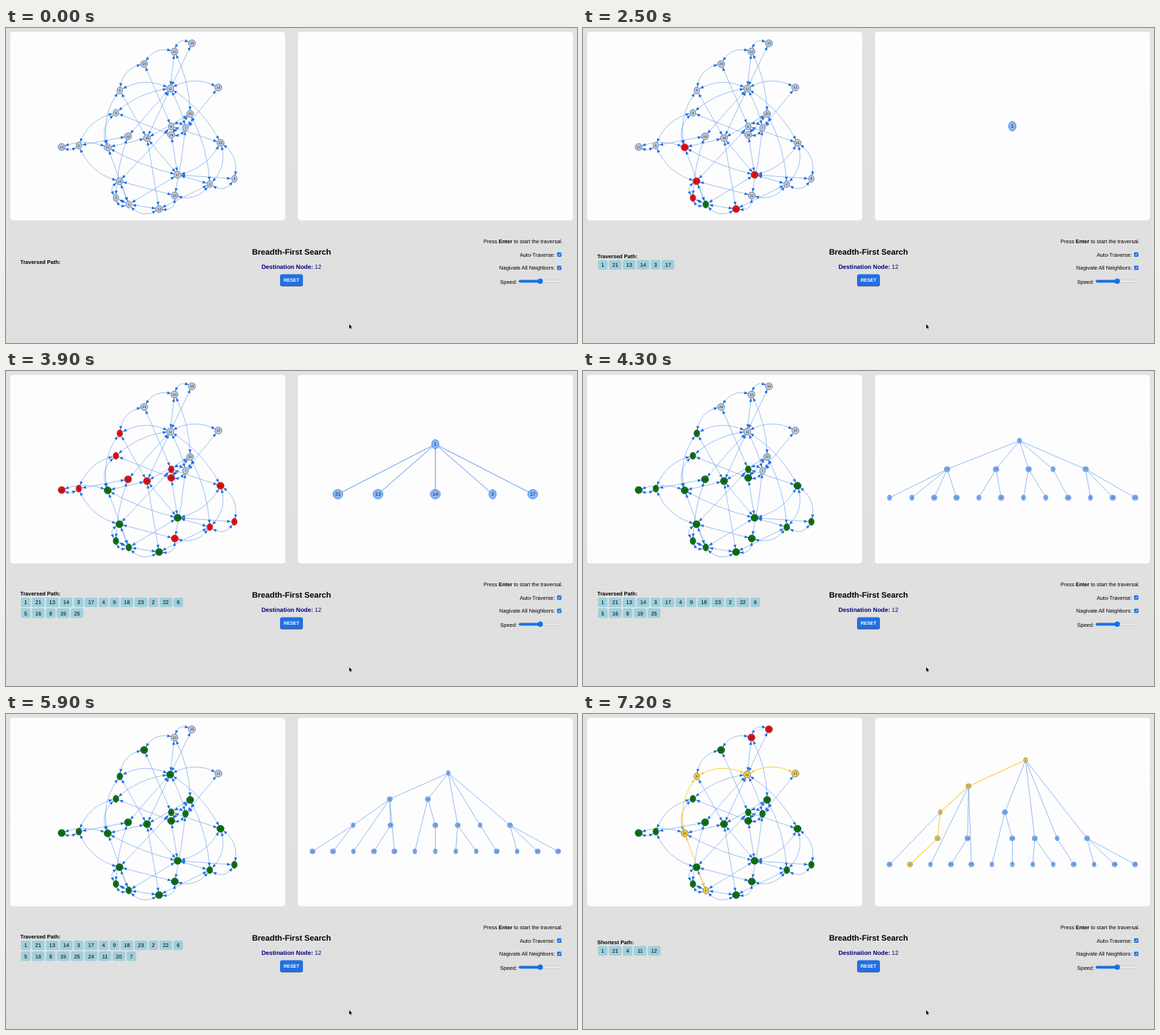
An HTML page with a canvas that plays this animation: 800 by 442 pixels, repeating every 7.3 s.

```html
<!DOCTYPE html>
<html lang="en">
<head>
<meta charset="utf-8">
<title>Breadth-First Search</title>
<style>
html, body { margin: 0; width: 100%; height: 100%; overflow: hidden; background: #e0e0e0; }
canvas { display: block; width: 800px; height: 442px; }
</style>
</head>
<body>
<canvas id="stage"></canvas>
<script>
const LOOP = 7300, START = 600, STEP = 720, LAST = 8;
const ROOT = 1, GOAL = 12;
const FONT = '"Liberation Sans", Arial, sans-serif';
const BLUE = '#1f6fe0', GOLD = '#f9d03f';
const RED_LOOK = ['#ec1014', '#a81a2c'], GREEN_LOOK = ['#077a10', '#0c4218'];
const GREY_LOOK = ['#cccccc', '#3d78cc'], GOLD_LOOK = ['#f8d03c', '#6c7788'];

const canvas = document.getElementById('stage');
const ctx = canvas.getContext('2d');
const dpr = window.devicePixelRatio || 1;
canvas.width = 800 * dpr;
canvas.height = 442 * dpr;

const clamp = (v, lo, hi) => Math.max(lo, Math.min(hi, v));
const mean = list => list.reduce((sum, v) => sum + v, 0) / list.length;

// Positions of nodes 1 to 25
const nodes = [
  [172, 247.5], [285.5, 219], [154, 238.5], [159.5, 87.5], [102, 165],
  [231.5, 138], [251.5, 140], [320, 211.5], [154, 119], [236, 33],
  [230, 85], [297.5, 83.5], [214.5, 254], [159, 215], [260.5, 21.5],
  [171, 152], [240.5, 206], [197.5, 154.5], [231.5, 150], [258, 120.5],
  [142.5, 167.5], [236.5, 235], [78, 167], [193.5, 50.5], [300.5, 161]
];
const at = id => nodes[id - 1];

// Neighbours of each node; "~" marks a straight edge, "^" one arching upwards
const links = `1:21~ 13 14~ 3 17~ 13~ 3~|21:4 9 18 23^ 17|13:2~ 22 18|14:6 5 22~ 3|3:16
|17:8~ 19 25 2~ 18|4:24 11 18|9:5 11 19|18:20 11|2:20 25 8 22|22:7|6:24 25 7 19
|5:16 23|16:11|8:25|19:7 20|25:11|24:10|11:10 15 12 7|20:10 7|7:12|10:15`;

// Outer and short edges bow away from the middle of the graph
function makeEdge(a, b, mark) {
  const [x0, y0] = at(a), [x1, y1] = at(b);
  const mx = (x0 + x1) / 2, my = (y0 + y1) / 2;
  const len = Math.hypot(x1 - x0, y1 - y0);
  const nx = (y1 - y0) / len, ny = (x0 - x1) / len;
  const out = (mx - 215) * nx + (my - 150) * ny;
  const size = Math.max(0, Math.abs(out) - 30) * 0.3 + Math.max(0, 40 - len) * 0.3;
  let bow = Math.sign(out) * Math.min(size, 10, len * 0.35);
  if (mark === '~') bow = 0;
  if (mark === '^') bow = -7 * Math.sign(ny);
  return { a, b, p: [x0, y0, mx + nx * bow * 2, my + ny * bow * 2, x1, y1] };
}
const edges = links.split('|').flatMap(part => {
  const [a, rest] = part.trim().split(':');
  return rest.split(' ').map(s => makeEdge(+a, parseInt(s), s.replace(/\d/g, '')));
});

// Breadth-first search
const parent = { [ROOT]: 0 };
const levels = [[ROOT]];
while (!(GOAL in parent)) {
  const next = [];
  for (const id of levels.at(-1))
    for (const { a, b } of edges) {
      const other = a === id ? b : b === id ? a : 0;
      if (!other || other in parent) continue;
      parent[other] = id;
      next.push(other);
    }
  levels.push(next);
}
const shortest = [];
for (let id = GOAL; id; id = parent[id]) shortest.unshift(id);
const onPath = id => shortest.includes(id);
const onRoute = (a, b) => onPath(a) && onPath(b) && (parent[a] === b || parent[b] === a);

// Leaves share the bottom row, every other node sits above its children
function layoutTree(ids) {
  const info = new Map(), leaves = [];
  const visit = id => {
    const kids = ids.filter(k => parent[k] === id);
    kids.forEach(visit);
    if (!kids.length) leaves.push(id);
    info.set(id, { kids, height: kids.length ? 1 + Math.max(...kids.map(k => info.get(k).height)) : 0 });
  };
  visit(ROOT);

  const n = leaves.length, cx = 601.5, cy = 137.8;
  const size = n > 1 ? Math.min(6.5, 344 / (n - 1) / 8.45) : 6.7;
  const half = Math.min(172, (n - 1) * 5.25 * size);
  const bulge = half < 172 ? 0.235 : 0;
  const gap = size * 10.8, depth = info.get(ROOT).height;
  for (const [id, item] of info) {
    if (item.kids.length) {
      item.x = cx + 0.73 * (mean(item.kids.map(k => info.get(k).x)) - cx);
    } else {
      const u = n > 1 ? leaves.indexOf(id) / (n - 1) * 2 - 1 : 0;
      item.x = cx + half * u * (1 + bulge * (1 - u * u));
    }
    item.y = cy + gap * (depth / 2 - item.height);
  }
  return { size, info };
}
const trees = levels.map((_, k) =>
  layoutTree(k < 4 ? levels.slice(0, k + 1).flat() : [...levels.slice(0, k).flat(), GOAL]));

function text(str, x, y, size, { bold, color = '#000', align = 'left' } = {}) {
  ctx.font = `${bold ? 'bold ' : ''}${size}px ${FONT}`;
  ctx.fillStyle = color;
  ctx.textAlign = align;
  ctx.fillText(str, x, y + size * 0.36);
  return ctx.measureText(str).width;
}

function box(x, y, w, h, r, fill, stroke) {
  ctx.beginPath();
  ctx.roundRect(x, y, w, h, r);
  ctx.fillStyle = fill;
  ctx.fill();
  if (!stroke) return;
  ctx.strokeStyle = stroke;
  ctx.lineWidth = 0.6;
  ctx.stroke();
}

function drawNode(id, x, y, rx, ry, font, [fill, border], width) {
  ctx.beginPath();
  ctx.ellipse(x, y, rx, ry, 0, 0, Math.PI * 2);
  ctx.fillStyle = fill;
  ctx.fill();
  ctx.strokeStyle = border;
  ctx.lineWidth = width;
  ctx.stroke();
  text(String(id), x, y, font, { color: '#222', align: 'center' });
}

function pointOn([x0, y0, cx, cy, x1, y1], t) {
  const u = 1 - t;
  return [u * u * x0 + 2 * u * t * cx + t * t * x1, u * u * y0 + 2 * u * t * cy + t * t * y1];
}

// Point of the curve at a given distance from its first end
function leave(p, dist) {
  let lo = 0, hi = 0.6;
  for (let i = 0; i < 14; i++) {
    const t = (lo + hi) / 2, [x, y] = pointOn(p, t);
    if (Math.hypot(x - p[0], y - p[1]) < dist) lo = t; else hi = t;
  }
  return pointOn(p, lo);
}

function arrow(p) {
  const [tx, ty] = leave(p, 5), [bx, by] = leave(p, 10.3);
  const len = Math.hypot(tx - bx, ty - by) || 1;
  const nx = (ty - by) / len * 2.1, ny = (bx - tx) / len * 2.1;
  ctx.beginPath();
  ctx.moveTo(tx, ty);
  ctx.lineTo(bx + nx, by + ny);
  ctx.lineTo(bx - nx, by - ny);
  ctx.fill();
}

function drawEdge({ p }, gold) {
  ctx.strokeStyle = gold ? GOLD : '#4d8eea';
  ctx.fillStyle = gold ? GOLD : BLUE;
  ctx.lineWidth = gold ? 1 : 0.55;
  ctx.beginPath();
  ctx.moveTo(p[0], p[1]);
  ctx.quadraticCurveTo(...p.slice(2));
  ctx.stroke();
  arrow(p);
  arrow([p[4], p[5], p[2], p[3], p[0], p[1]]);
}

function drawGraph(step) {
  const done = step >= LAST;
  const isGold = e => done && onRoute(e.a, e.b);
  edges.filter(e => !isGold(e)).forEach(e => drawEdge(e, false));
  edges.filter(isGold).forEach(e => drawEdge(e, true));
  nodes.forEach(([x, y], i) => {
    const id = i + 1;
    const age = step - 2 * levels.findIndex(l => l.includes(id));
    const look = done && onPath(id) ? GOLD_LOOK : age > 0 ? GREEN_LOOK : age === 0 ? RED_LOOK : GREY_LOOK;
    drawNode(id, x, y, id > 9 ? 4.9 : 3.8, 4.8, 5, look, 0.9);
  });
}

function drawTree(step) {
  if (step < 1) return;
  const done = step >= LAST;
  const { size, info } = trees[done ? 4 : Math.floor((step - 1) / 2)];
  const big = size > 5;
  for (const [id, { x, y }] of info) {
    const from = info.get(parent[id]);
    if (!from) continue;
    const gold = done && onRoute(id, parent[id]);
    ctx.strokeStyle = gold ? GOLD : '#4d8de9';
    ctx.lineWidth = gold ? 1.1 : big ? 0.9 : 0.6;
    ctx.beginPath();
    ctx.moveTo(from.x, from.y);
    ctx.lineTo(x, y);
    ctx.stroke();
  }
  for (const [id, { x, y }] of info) {
    const look = done && onPath(id) ? GOLD_LOOK : ['#8ab6fa', '#3b80e6'];
    drawNode(id, x, y, size * (id > 9 ? 1.06 : 0.77), size, size * 1.07, look, big ? 0.9 : 0.7);
  }
}

function drawPath(step) {
  const done = step >= LAST;
  const ids = done ? shortest : levels.slice(0, Math.floor(step / 2) + 1).flat();
  const y = 327.8 - 7.6 * Math.ceil(ids.length / 13);
  text(done ? 'Shortest Path:' : 'Traversed Path:', 20, y, 7.5, { bold: true });
  let x = 21;
  ids.forEach((id, i) => {
    if (i === 13) x = 21;
    const w = id > 9 ? 17.6 : 13.4, cy = y + 12 + 15.2 * Math.floor(i / 13);
    box(x, cy - 6.7, w, 13.4, 2, '#9fcfdc');
    text(String(id), x + w / 2, cy, 7.5, { align: 'center' });
    x += w + 1.95;
  });
}

function checkbox(label, y) {
  text(label, 769, y, 7.5, { align: 'right' });
  box(772.1, y - 3, 6.1, 6.1, 1.2, '#1470e8');
  ctx.strokeStyle = '#fff';
  ctx.lineWidth = 0.9;
  ctx.beginPath();
  ctx.moveTo(773.5, y + 0.2);
  ctx.lineTo(774.7, y + 1.4);
  ctx.lineTo(776.9, y - 1.5);
  ctx.stroke();
}

function drawControls() {
  text('Breadth-First Search', 400, 314, 11.2, { bold: true, align: 'center' });
  const color = '#000080';
  const w = text('Destination Node:', 358, 334.6, 8.45, { bold: true, color });
  text(' ' + GOAL, 358 + w, 334.6, 8.45, { color });

  box(384, 346.6, 32, 16, 3, '#3c4e68');
  box(384, 345.4, 32, 16, 3, '#216fe3');
  text('RESET', 400, 353.5, 6.6, { bold: true, color: '#fff', align: 'center' });

  let x = 669;
  x += text('Press ', x, 299.3, 7.5);
  x += text('Enter', x, 299.3, 7.5, { bold: true });
  text(' to start the traversal.', x, 299.3, 7.5);
  checkbox('Auto-Traverse:', 317.8);
  checkbox('Nagivate All Neighbors:', 336.5);

  text('Speed:', 716, 355.8, 7.5, { align: 'right' });
  box(718.6, 353.8, 60, 3.2, 1.6, '#efefef', '#b4b4b4');
  box(718.4, 353.6, 30, 3.6, 1.8, '#1470e8');
  ctx.beginPath();
  ctx.arc(748.5, 355.3, 3.7, 0, Math.PI * 2);
  ctx.fill();
}

function drawCursor() {
  ctx.beginPath();
  ctx.moveTo(480.8, 415.4);
  for (const [dx, dy] of [[0, 6.3], [1.4, 5.1], [2.3, 7.1], [3.3, 6.6], [2.4, 4.7], [4.2, 4.6]])
    ctx.lineTo(480.8 + dx, 415.4 + dy);
  ctx.closePath();
  ctx.strokeStyle = '#fff';
  ctx.lineWidth = 1;
  ctx.stroke();
  ctx.fillStyle = '#000';
  ctx.fill();
}

function draw(now) {
  const step = clamp(Math.floor((now % LOOP - START) / STEP), -2, LAST);
  ctx.setTransform(dpr, 0, 0, dpr, 0, 0);
  ctx.textRendering = 'geometricPrecision';
  const bg = ctx.createLinearGradient(0, 0, 0, 442);
  bg.addColorStop(0, '#e2e2e2');
  bg.addColorStop(1, '#dfdfdf');
  ctx.fillStyle = bg;
  ctx.fillRect(0, 0, 800, 442);
  for (const x of [5.2, 408.4]) box(x, 4.8, 386.6, 265.8, 5, '#fdfdfd', '#d3d3d3');
  drawGraph(step);
  drawTree(step);
  drawPath(step);
  drawControls();
  drawCursor();
}

const origin = performance.now();
function tick() {
  draw(performance.now() - origin);
  requestAnimationFrame(tick);
}
tick();
</script>
</body>
</html>
```
